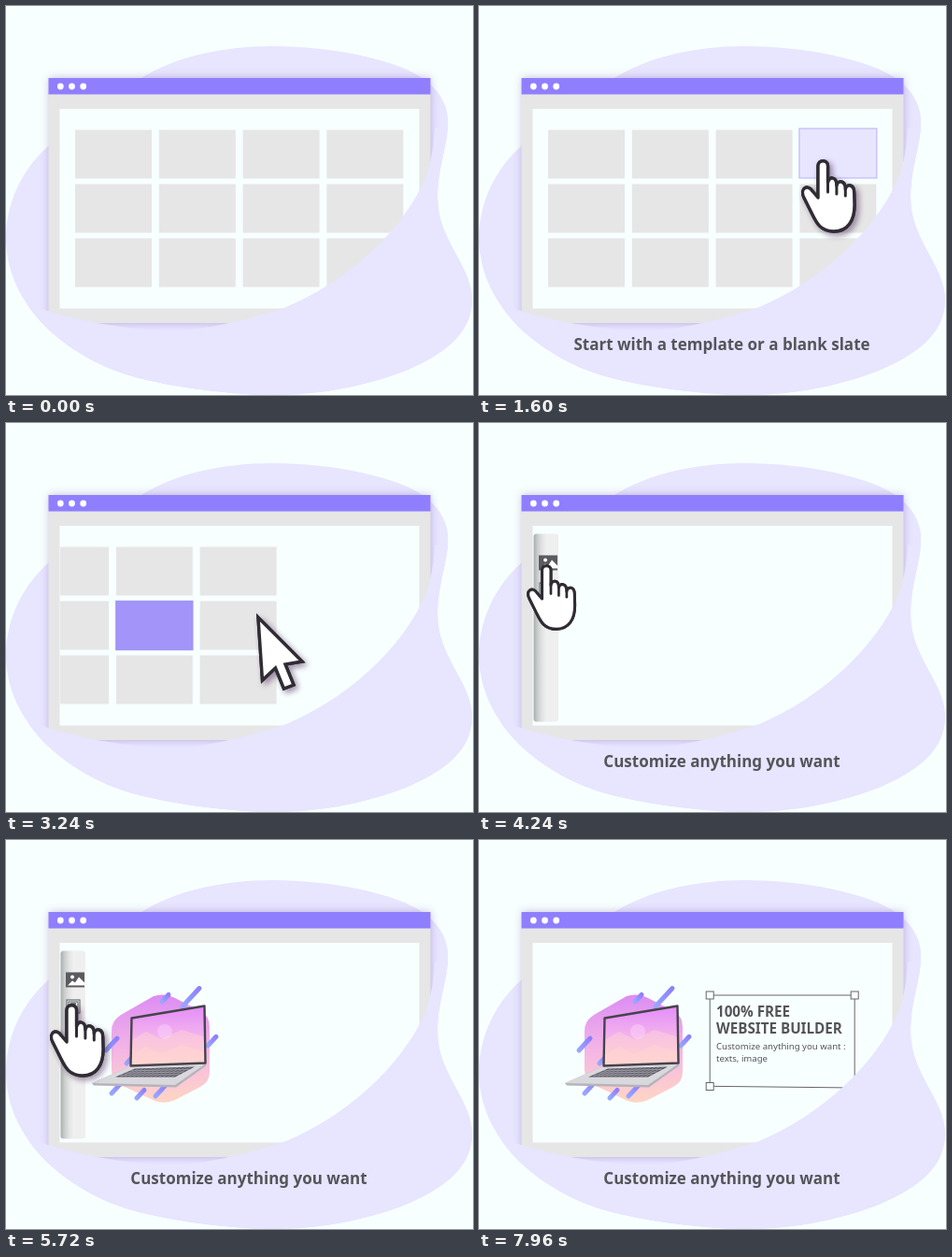
Recreate the animation shown at these times as an HTML page with a canvas. Size 500 px wide and 416 px high, loop 8000 ms.

```html
<!DOCTYPE html>
<html lang="en">
<head>
<meta charset="utf-8">
<title>Site builder demo</title>
<style>
html, body { margin: 0; width: 100%; height: 100%; overflow: hidden; background: #f8ffff; }
canvas { display: block; width: 500px; height: 416px; }
</style>
</head>
<body>
<canvas id="stage"></canvas>
<script>
const LOOP = 8000, W = 500, H = 416;
const PAPER = '#f8ffff', LAVENDER = '#e7e5ff', VIOLET = '#8f7fff', GREY = '#e6e6e6';
const INK = '#545459', OUTLINE = '#302c34';
const FONT = '"Noto Sans", "Open Sans", sans-serif';
const canvas = document.getElementById('stage');
const c = canvas.getContext('2d');
const dpr = window.devicePixelRatio || 1;
canvas.width = W * dpr;
canvas.height = H * dpr;

const span = (t, a, b) => Math.max(0, Math.min(1, (t - a) / (b - a)));
const inOut = k => k * k * (3 - 2 * k);
const inBack = k => 2.70158 * k ** 3 - 1.70158 * k ** 2;
const outBack = k => 1 - inBack(1 - k);
const within = (t, a, b) => t >= a && t < b;
const pulse = (t, a, b, ramp) => inOut(span(t, a, a + ramp)) * (1 - inOut(span(t, b, b + ramp)));

// Each glide: start time, duration, destination
const GLIDES = [
  [300, 520, 112, 166], [820, 660, 368, 165], [1760, 600, 270, 208], [3440, 680, 72, 152],
  [4240, 560, 170, 224.5], [5160, 560, 70, 176], [5940, 300, 313, 206.5]
];

function cursorAt(t) {
  return GLIDES.reduce(([x, y], [start, time, toX, toY]) => {
    const k = inOut(span(t, start, start + time));
    return [x + (toX - x) * k, y + (toY - y) * k];
  }, [120, 450]);
}

function box(x, y, w, h, fill, stroke) {
  c.fillStyle = fill;
  c.fillRect(x, y, w, h);
  if (!stroke) return;
  c.strokeStyle = stroke;
  c.lineWidth = 1;
  c.strokeRect(x, y, w, h);
}

function dot(x, y, r, fill) {
  c.fillStyle = fill;
  c.beginPath();
  c.arc(x, y, r, 0, 7);
  c.fill();
}

function line(x0, y0, x1, y1, color, width) {
  c.strokeStyle = color;
  c.lineWidth = width;
  c.beginPath();
  c.moveTo(x0, y0);
  c.lineTo(x1, y1);
  c.stroke();
}

function fade(x0, y0, x1, y1, ...colors) {
  const g = c.createLinearGradient(x0, y0, x1, y1);
  colors.forEach((col, i) => g.addColorStop(i / (colors.length - 1), col));
  return g;
}

function shape(path, fill) {
  c.fillStyle = fill;
  c.fill(new Path2D(path));
}

function group(draw) {
  c.save();
  draw();
  c.restore();
}

function layer(alpha, draw) {
  if (alpha <= 0) return;
  group(() => {
    c.globalAlpha = alpha;
    draw();
  });
}

function shadow(color, blur, offset) {
  c.shadowColor = color;
  c.shadowBlur = blur * dpr;
  c.shadowOffsetX = c.shadowOffsetY = offset * dpr;
}

const blob = new Path2D(`M145 77 C180 55 230 43 285 43 C350 43 420 58 447 78
  C468 93 475 112 473 130 C471 155 462 175 462 205 C462 250 499 278 499 314
  C499 352 465 374 430 389 C390 405 340 416 285 416 C230 416 150 403 120 391
  C48 364 0 310 0 248 C0 210 18 174 45 150 Z`);
const wave = new Path2D(`M30 321 C75 337 130 347 180 347 C210 347 250 338 300 322
  C365 295 425 240 449 184 C455 168 458 150 459 130 H520 V430 H-10 V321 Z`);
const arrow = new Path2D('M0 0 L47 47 L29 50 L38 72 L27.5 76 L18.5 54 L4.5 67 Z');
const hand = makeHand();

function makeHand() {
  const p = new Path2D();
  p.moveTo(-5, 40);
  p.lineTo(-5, 6);
  p.bezierCurveTo(-5, -1, 5.5, -1, 5.5, 6);
  p.lineTo(5.5, 24);
  for (let i = 0; i < 3; i++) {
    const x = 5.5 + i * 9.4, y = 23 + i * 4;
    p.bezierCurveTo(x + 1, y - 6, x + 9.4, y - 6, x + 9.4, y + 4);
  }
  p.lineTo(34, 48);
  p.bezierCurveTo(34, 64, 27, 76, 12, 76);
  p.bezierCurveTo(-3, 76, -7, 66, -12, 56);
  p.lineTo(-20, 40);
  p.bezierCurveTo(-25, 30, -16, 25, -11, 33);
  p.closePath();
  return p;
}

function drawWindow() {
  group(() => {
    shadow('rgba(100,60,150,.34)', 9, 0);
    box(45.5, 77, 409, 262, GREY);
  });
  box(45.5, 77, 409, 17.5, VIOLET);
  for (let i = 0; i < 3; i++) dot(58.3 + i * 12.2, 86, 3.4, '#fff');
  box(57.5, 110, 385, 213.5, PAPER);
}

function drawGrid(t, [px, py]) {
  const dx = -456 * inBack(span(t, 2680, 3380));
  const picked = t >= 2480;
  for (let i = 0; i < 12; i++) {
    const x = 74 + i % 4 * 89.8, y = 132.5 + Math.floor(i / 4) * 58;
    const over = within(px, x, x + 82) && within(py, y, y + 52);
    if (picked && i === 6) box(x + dx - .7, y - .7, 83.4, 53.4, '#a294f8');
    else if (!picked && over) box(x - .5, y - 1.5, 83, 53, LAVENDER, '#b9b0f5');
    else box(x + dx, y, 82, 52, GREY);
  }
}

function imageIcon(x, y) {
  group(() => {
    c.translate(x, y);
    box(-10, -8, 20, 16, '#5b5b5f');
    dot(-3, -3, 2, '#fff');
    shape('M-8 6 L-3 1 L0 3 L4 -3 L10 3 V6 Z', '#fff');
  });
}

function textIcon(x, y) {
  for (const r of [7, 5]) box(x - r, y - r, r * 2, r * 2, PAPER, INK);
  line(x - 3, y - 3, x + 3, y - 3, INK, 1.6);
  line(x, y - 3, x, y + 4, INK, 1.6);
}

function drawPanel(t) {
  const k = pulse(t, 3560, 4300, 280) + pulse(t, 5180, 6000, 280);
  if (k <= 0) return;
  group(() => {
    c.translate(-28 * (1 - k), 0);
    c.fillStyle = fade(58.5, 0, 72, 0, '#a9adad', '#cdcfcf', '#e2e3e3', '#efefef');
    c.beginPath();
    c.roundRect(58.5, 118.5, 26.5, 201, 3);
    c.fill();
    if (!within(t, 4240, 5100)) imageIcon(74, 149.5);
    if (t < 5940) textIcon(72, 178);
  });
}

// Diagonal dashes: lower-left end and reach
const DASHES = [
  [189, 178, 18], [167, 173, 7], [107, 225, 12], [216, 220, 9],
  [113, 271, 11], [140, 276, 8], [160, 274, 11], [129, 239, 7]
];

function drawLaptop() {
  shape(`M158 167 Q169 163 181 169 L208 183 Q218 188 218 200 V248
    Q218 259 208 264 L181 278 Q168 284 155 277 L123 262 Q113 257 113 246 V206
    Q112 194 123 187 Z`, fade(0, 166, 0, 281, '#dc8df3', '#f3b5e6', '#ffd6c4'));

  c.lineCap = 'round';
  for (const [x, y, d] of DASHES) {
    line(x, y, x + d, y - d * 1.08, fade(x, y, x + d, y - d, '#96a8ff', VIOLET), 5);
  }
  c.lineCap = 'butt';

  shape('M92 260 L133 242 L214 239 V241.5 L182 264.5 L94 262.5 Z', '#b5b3bb');
  shape('M92 260 L133 242 L214 239 L181 262 Z', '#d9d8dd');
  shape('M117 253.5 L138 244.5 L202 242.5 L181 253.5 Z', '#56545e');
  for (let i = 1; i < 14; i++) {
    const x = 117 + i * 4.6;
    line(x, 253.5, x + 21, 244.5 - i * .14, '#b9b7c0', .5);
    if (i < 4) line(117 + i * 5.2, 253.5 - i * 2.2, 181 + i * 5.2, 253.5 - i * 2.7, '#b9b7c0', .6);
  }

  const screen = new Path2D('M134.5 190.5 L212.5 177.5 L213.5 238.5 L133.5 241.5 Z');
  c.fillStyle = fade(0, 180, 0, 241, '#e590f8', '#f3b4ec', '#ffd3c6');
  c.fill(screen);
  group(() => {
    c.clip(screen);
    dot(170, 205, 8, 'rgba(255,220,255,.38)');
    for (const y of [205, 221]) {
      shape(`M133 ${y + 10} L150 ${y} L166 ${y + 8} L188 ${y - 2} L214 ${y + 6} V242 H133 Z`,
        'rgba(255,212,210,.45)');
    }
  });
  c.strokeStyle = '#46434d';
  c.lineWidth = 2.4;
  c.lineJoin = 'round';
  c.stroke(screen);
}

const COPY = [
  ['100% FREE', 188.5, '700 15.2px '],
  ['WEBSITE BUILDER', 206.5, '700 15.2px '],
  ['Customize anything you want :', 224, '400 9.6px '],
  ['texts, image', 237.3, '400 9.6px ']
];

function drawTextBox(t) {
  const k = outBack(span(t, 6380, 6760));
  if (k <= 0) return;
  group(() => {
    c.translate(324.7, 215);
    c.scale(k, k);
    c.strokeStyle = '#66666b';
    c.lineWidth = 1;
    c.stroke(new Path2D('M-77.5 -49 H77.5 V50 L-77.5 48.3 Z'));
    for (const x of [-77.5, 77.5]) {
      for (const y of [-49, 48.5]) box(x - 4, y - 4, 8, 8, PAPER, '#66666b');
    }
  });

  let left = t < 6880 ? 0 : Math.ceil(65 * (t - 6840) / 1120);
  c.fillStyle = INK;
  c.textAlign = 'left';
  for (const [text, y, style] of COPY) {
    c.font = style + FONT;
    c.fillText(text.slice(0, Math.max(0, left)), 254, y);
    left -= text.length;
  }
}

function caption(text, y) {
  c.font = '700 17px ' + FONT;
  c.textAlign = 'center';
  c.fillStyle = INK;
  c.fillText(text, 260, y);
}

function drawCursor(t, [x, y]) {
  const pointing = !within(t, 2440, 3700) && !within(t, 4840, 5600);
  const press = pointing ? pulse(t, 4120, 4740, 100) : 0;
  const path = pointing ? hand : arrow;
  c.translate(x, y);
  c.scale(1 - .1 * press, 1 - .1 * press);
  c.fillStyle = '#fff';
  c.strokeStyle = OUTLINE;
  c.lineWidth = 3.4;
  c.lineJoin = pointing ? 'round' : 'miter';
  group(() => {
    shadow(`rgba(60,20,70,${.4 * (1 - press)})`, 6, 3);
    c.fill(path);
    c.stroke(path);
  });
  c.fill(path);
  c.stroke(path);
  if (!pointing) return;
  c.lineCap = 'round';
  for (let i = 0; i < 3; i++) {
    const fx = 5.5 + i * 9.4;
    line(fx, 22 + i * 4, fx, 34 + i * 2, OUTLINE, 3);
  }
}

function draw(t) {
  c.setTransform(dpr, 0, 0, dpr, 0, 0);
  const tip = cursorAt(t);
  box(0, 0, W, H, PAPER);
  c.fillStyle = LAVENDER;
  c.fill(blob);
  drawWindow();

  group(() => {
    c.beginPath();
    c.rect(58, 110, 384.5, 213.5);
    c.clip();
    drawGrid(t, tip);
    drawPanel(t);
    layer(inOut(span(t, 4760, 5080)), drawLaptop);
    drawTextBox(t);
  });

  // Front part of the blob covers the lower window
  group(() => {
    c.clip(blob);
    c.fillStyle = LAVENDER;
    c.fill(wave);
  });

  const drop = 64 * (1 - span(t, 80, 680)) ** 3;
  layer(1 - span(t, 2640, 2920), () => caption('Start with a template or a blank slate', 368 + drop));
  layer(span(t, 3520, 3840), () => caption('Customize anything you want', 368));

  if (within(t, 4240, 4840)) imageIcon(tip[0] + 2, tip[1] - 2.5);
  if (within(t, 5940, 6400)) textIcon(tip[0] - 1.5, tip[1] + 2);
  layer(1 - span(t, 6400, 6520), () => drawCursor(t, tip));
}

const start = performance.now();
function tick() {
  draw((performance.now() - start) % LOOP);
  requestAnimationFrame(tick);
}
tick();
</script>
</body>
</html>
```
